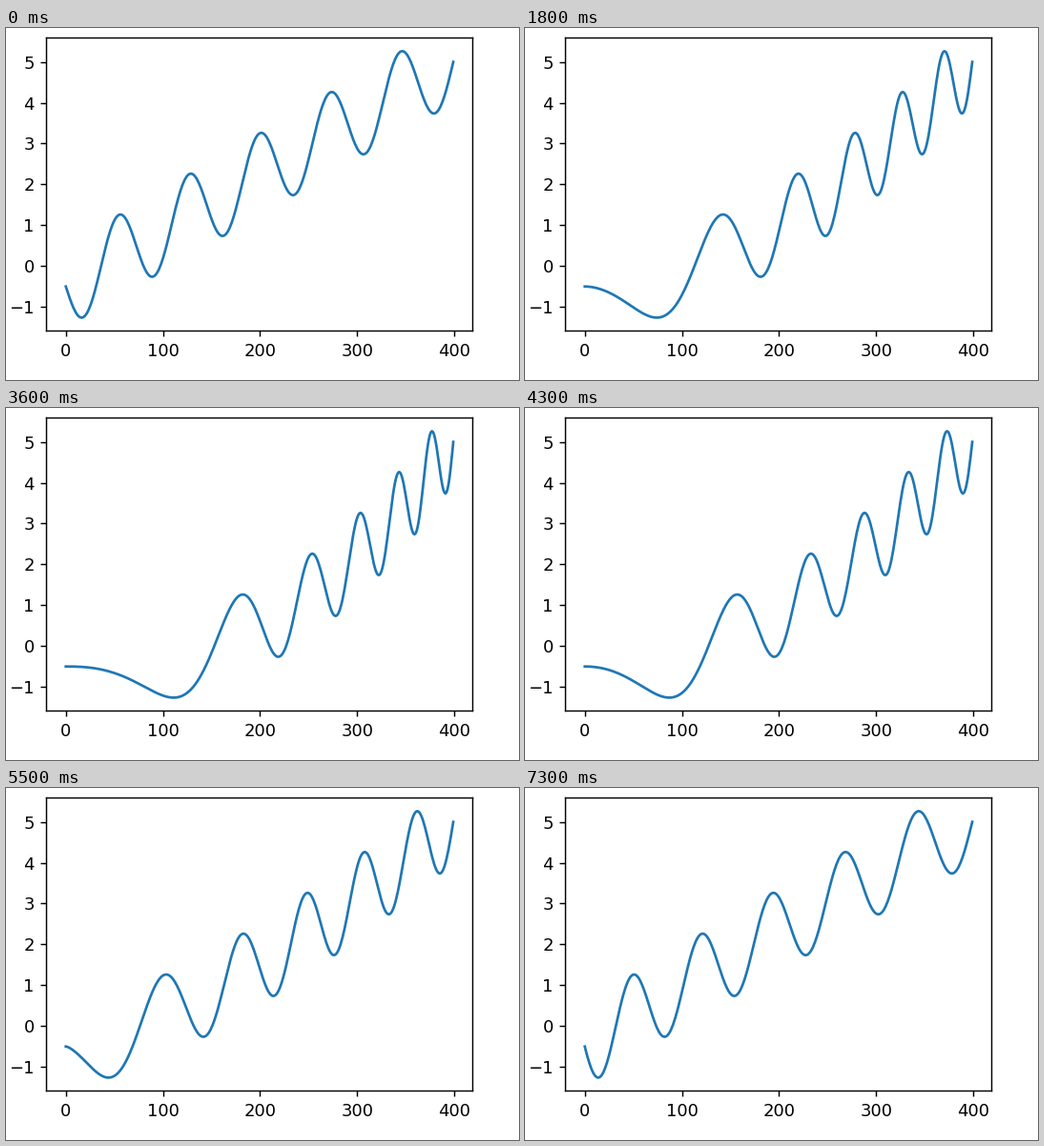
A matplotlib script that plays this animation: 538x370 px, repeating every 8 s.

```python
import matplotlib.pyplot as plt
import numpy as np
from matplotlib.animation import FuncAnimation

W, H = 538, 370
DPI = 100
STEP = 100            # ms per frame
LOOP = 8000           # ms
SCALE = 1.3           # size of the default style relative to 100 dpi

# (start in ms, warp exponent)
WARPS = [(0, 1.0), (700, 1.35), (1300, 1.55), (1800, 1.9), (2500, 2.1),
         (3000, 2.15), (3600, 2.5), (4300, 2.1), (4900, 1.9),
         (5500, 1.45), (6800, 1.2), (7300, 0.95)]

plt.rcParams.update({
    "font.family": "DejaVu Sans",
    "font.size": 10 * SCALE,
    "axes.linewidth": 0.8 * SCALE,
    "lines.linewidth": 1.5 * SCALE,
})
for axis in ("xtick", "ytick"):
    plt.rcParams.update({
        f"{axis}.major.size": 3.5 * SCALE,
        f"{axis}.major.width": 0.8 * SCALE,
        f"{axis}.major.pad": 3.5 * SCALE,
    })

u = np.linspace(0, 1, 400)


def wave(power):
    v = -0.5 + 5.5 * u ** power
    return v + np.sin(2 * np.pi * v)


def power_at(ms):
    return [p for start, p in WARPS if start <= ms][-1]


fig = plt.figure(figsize=(W / DPI, H / DPI), dpi=DPI, facecolor="white")
left, right, top, bottom = 42.4, 489.4, 10.4, 318.4
ax = fig.add_axes([left / W, 1 - bottom / H, (right - left) / W, (bottom - top) / H])
line, = ax.plot(wave(1.0), color="#1f77b4")
ax.set_xlim(-19.95, 418.95)
ax.set_ylim(-1.588, 5.588)
ax.set_xticks(range(0, 401, 100))
ax.set_yticks(range(-1, 6))


def draw(i):
    line.set_ydata(wave(power_at(i * STEP)))
    return line,


anim = FuncAnimation(fig, draw, frames=LOOP // STEP, interval=STEP,
                     repeat=True, repeat_delay=0, blit=False)
plt.show()
```
